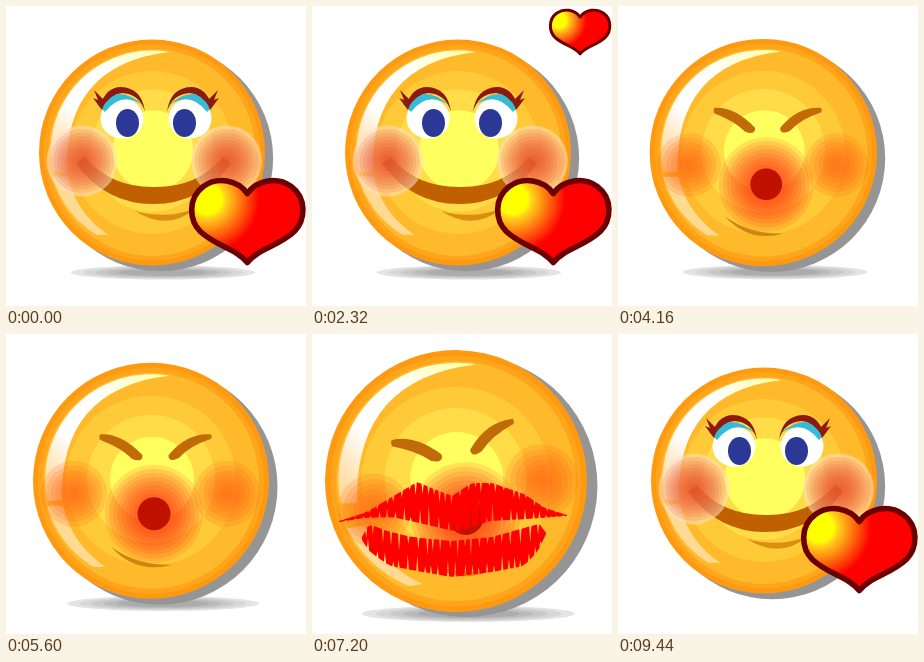
Animation of 300 by 300 pixels, one loop 9.52 s. Source, as an HTML page with a canvas:

```html
<!DOCTYPE html>
<html>
<head>
<meta charset="utf-8">
<style>
html, body { margin: 0; width: 100%; height: 100%; overflow: hidden; background: #fff; }
canvas { display: block; width: 100vw; height: 100vh; }
</style>
</head>
<body>
<canvas id="stage" width="300" height="300"></canvas>
<script>
const ctx = document.getElementById('stage').getContext('2d');
const LOOP = 9520;

function shape(d, fill, stroke, width) {
  const path = new Path2D(d);
  if (fill) { ctx.fillStyle = fill; ctx.fill(path); }
  if (stroke) {
    ctx.strokeStyle = stroke;
    ctx.lineWidth = width;
    ctx.lineCap = ctx.lineJoin = 'round';
    ctx.stroke(path);
  }
}

function oval(x, y, rx, ry, fill) {
  ctx.beginPath();
  ctx.ellipse(x, y, rx, ry, 0, 0, Math.PI * 2);
  ctx.fillStyle = fill;
  ctx.fill();
}

const disc = (x, y, r, fill) => oval(x, y, r, r, fill);

function rings(x, y, r, count, fill) {
  for (let i = count; i > 0; i--) disc(x, y, r * i / count, fill);
}

function placed(x, y, scale, angle, draw) {
  ctx.save();
  ctx.translate(x, y);
  ctx.rotate(angle);
  ctx.scale(scale, scale);
  draw();
  ctx.restore();
}

function groundShadow(x, y, rx, ry) {
  for (let i = 0; i < 5; i++) {
    const g = 228 - i * 14;
    oval(x, y, rx * (1 - i * .13), ry * (1 - i * .13), `rgb(${g},${g},${g})`);
  }
}

// Ball centred on the origin, radius 118.
function ball() {
  disc(8.5, 6, 118, '#959595');
  disc(0, 0, 118, '#ff9a10');
  disc(0, 0, 113, '#ffa51c');
  disc(0, 0, 108, '#ffba2c');
  disc(0, 0, 85, '#ffca38');
  disc(0, -2, 64, '#ffdc48');
  disc(1, -2, 42, '#ffff60');
  shape('M-104 25A107 107 0 0 0-58 86L-46 86Q-80 62-88 25Z', 'rgba(255,240,215,.6)');
}

function shine() {
  const light = ctx.createLinearGradient(20, -105, -100, 25);
  light.addColorStop(0, '#ffffa0');
  light.addColorStop(.35, '#fff');
  light.addColorStop(.65, '#fff');
  light.addColorStop(1, 'rgba(255,235,215,.55)');
  shape('M-104 20A106 106 0 0 1 18-105Q-92-92-89 20Z', light);
}

function eye() {
  oval(-34, 1.5, 21.5, 20, '#fff');
  shape('M-59-13Q-36-34-12-11Q-34-27-51-5Z', '#35bcd6');
  shape('M-56-11Q-50-30-35-30Q-14-29-11-5Q-16-23-34-24Q-46-23-54-9Z', '#8c1a10');
  shape('M-51-16L-62-27L-58-17L-63-19L-54-7Z', '#8c1a10');
  oval(-28.5, 6, 11.5, 14, '#2b3896');
}

function happyFace() {
  placed(146, 146.5, 113 / 118, 0, () => { ball(); shine(); });
  shape('M70 158Q100 198 147 198Q195 198 225 158L217 151Q191 182 147 181Q104 181 79 151Z', '#c06000');
  shape('M129 205Q162 226 190 202Q162 214 129 205Z', '#d98f10');
  for (const x of [76, 220.5]) {
    disc(x, 155, 35.5, 'rgba(255,222,195,.55)');
    rings(x, 155, 32, 9, 'rgba(228,62,22,.14)');
  }
  placed(150, 111, 1, 0, () => {
    eye();
    ctx.scale(-1, 1);
    eye();
  });
}

// u = 0 is the upright start of the lean, u = 1 its closest point.
function kissFace(u) {
  const x = 145 - 2 * u, y = 146.7 + .8 * u, scale = 1 + .22 * u;
  const angle = -Math.max(u, 0) * Math.PI / 9;
  groundShadow(157 - u, 269.5 + 20.5 * u, 96 * scale, 7.5 + 1.5 * u);
  placed(x, y, scale, angle, ball);
  placed(x, y, scale, 0, shine);
  placed(x, y, scale, angle, () => {
    for (const cx of [-77, 76]) rings(cx, 13, 33, 7, 'rgba(255,95,20,.18)');
    rings(3, 33, 49, 12, 'rgba(255,35,10,.13)');
    disc(3, 33, 16.5, '#c01000');
    const brow = '#c06a08';
    shape('M-50-45Q-30-46-10-25Q-10-20-18-23Q-29-34-50-42Z', brow, brow, 3);
    shape('M59-45Q36-46 19-25Q19-20 27-24Q38-36 59-43Z', brow, brow, 3);
    shape('M-40 66Q-15 94 21 84Q-14 85-40 66Z', '#cf8510');
  });
}

const HALF_HEART = 'C-10-42-30-45-44-35C-60-23-58-1-47 10C-31 25-11 27 0 41';
const HEART = 'M0-28' + HALF_HEART + 'C11 27 31 25 47 10C58-1 60-23 44-35C30-45 10-42 0-28Z';

function heart(x, y, scale) {
  placed(x, y, scale, 0, () => {
    const glow = ctx.createRadialGradient(-40, -22, 0, -40, -22, 52);
    glow.addColorStop(0, '#ff0');
    glow.addColorStop(.28, '#ff0');
    glow.addColorStop(.36, '#ffd21c');
    glow.addColorStop(1, '#f00');
    shape(HEART, glow, '#6c0000', 5.6);
  });
}

function random(seed) {
  return () => (seed = seed * 16807 % 2147483647) / 2147483647;
}

function edgeAt(points, x) {
  const i = Math.max(1, points.findIndex(p => p[0] >= x));
  const [x0, y0] = points[i - 1], [x1, y1] = points[i];
  return y0 + (y1 - y0) * (x - x0) / (x1 - x0);
}

// Blunt teeth along one outline, parted by narrow slits towards the other.
function ragged(edge, other, depth, next) {
  const points = [], right = edge[edge.length - 1][0];
  let x = edge[0][0];
  while (x < right) {
    const end = Math.min(x + 3 + next() * 5, right);
    const slit = Math.min(end + 1, right);
    const y = edgeAt(edge, slit);
    points.push([x, edgeAt(edge, x)], [end, edgeAt(edge, end)]);
    points.push([slit, y + (edgeAt(other, slit) - y) * depth * (.2 + .8 * next())]);
    x = end + 2.2;
  }
  return points;
}

function lip(top, bottom, seed, topDepth, bottomDepth) {
  const next = random(seed);
  const upper = ragged(top, bottom, topDepth, next);
  const lower = ragged(bottom, top, bottomDepth, next).reverse();
  return 'M' + upper.concat(lower).join('L') + 'Z';
}

const UPPER_LIP = lip(
  [[27, 187], [55, 178], [80, 163], [105, 148], [122, 155], [140, 162], [160, 149], [180, 149], [212, 160], [233, 174], [255, 181]],
  [[27, 188], [52, 184], [80, 183], [112, 190], [145, 198], [178, 187], [215, 185], [255, 182]],
  77, .35, .6);
const LOWER_LIP = lip(
  [[50, 203], [57, 190], [75, 197], [100, 203], [140, 207], [180, 203], [212, 194], [231, 189], [234, 199]],
  [[50, 206], [58, 218], [78, 232], [105, 237], [140, 243], [180, 238], [212, 232], [226, 217], [234, 200]],
  4242, .5, .5);

function lips(alpha) {
  ctx.globalAlpha = alpha;
  shape(UPPER_LIP, '#f00');
  shape(LOWER_LIP, '#f00');
  ctx.globalAlpha = 1;
}

function flyingHeart(t) {
  const step = Math.floor((t - 160) % 880 / 80) - 3;
  if (t < 240 || step > 3) return;
  heart(263.7 + 2.2 * step, 96 - 35 * step, (42 + 10 * step) / 116);
}

function render(t) {
  ctx.fillStyle = '#fff';
  ctx.fillRect(0, 0, 300, 300);
  if (t < 4160) {
    groundShadow(157, 266.5, 92, 7);
    happyFace();
    heart(241.3, 215.5, 1);
    flyingHeart(t);
  } else if (t < 7680) {
    const lean = Math.floor((t - 5600) / 160);
    const u = t < 5600 ? -1 / 6 : t < 6720 ? lean / 6 : 1 - (lean - 7) / 6;
    kissFace(u);
    if (t >= 6560) lips(1);
  } else {
    happyFace();
    const fade = Math.max(0, Math.floor((t - 8320) / 160)) / 7;
    if (t < 9440) lips(1 - fade ** 1.5);
    else heart(241.3, 215.5, 1);
  }
}

function tick() {
  render(performance.now() % LOOP);
  requestAnimationFrame(tick);
}
tick();
</script>
</body>
</html>
```
